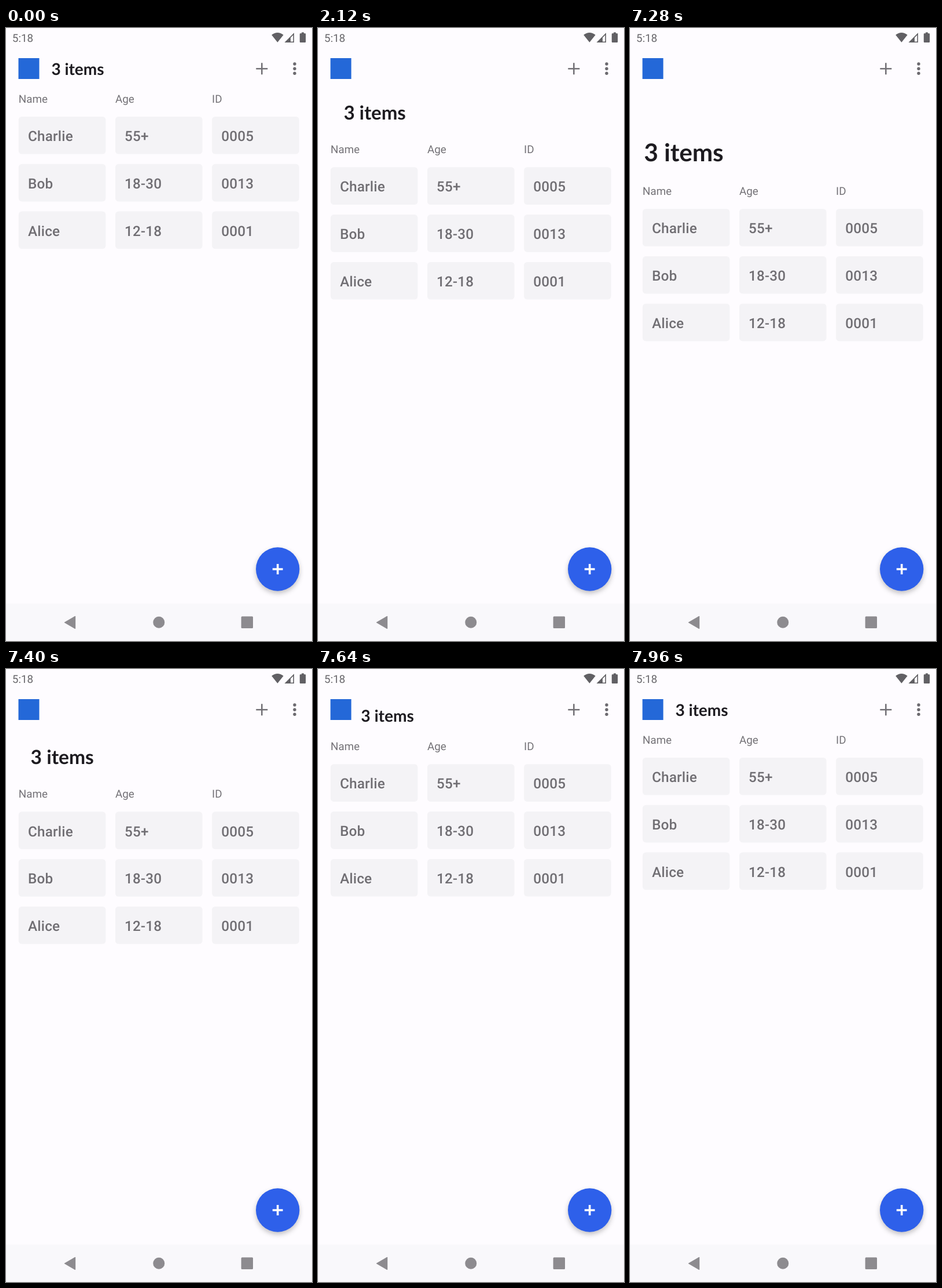
An HTML page for the animation above (10 s loop, 529x1058 px).

```html
<!DOCTYPE html>
<html lang="en">
<head>
<meta charset="utf-8">
<title>Item list</title>
<style>
  html, body { margin: 0; width: 100%; height: 100%; overflow: hidden; background: #fefcff; }
  svg { display: block; width: 100%; height: 100%; }
  text { font-family: Roboto, sans-serif; text-rendering: geometricPrecision; white-space: pre; }
  #title { font-family: Lato, sans-serif; font-weight: 700; fill: #1d1b20; }
  .small { font-size: 18.86px; fill: #747277; }
  .value { font-size: 24.25px; font-weight: 500; letter-spacing: .23px; fill: #706e73; }
  .cell { fill: #f4f3f6; }
  .status { fill: #616064; }
  .nav { fill: #8d8b8f; }
  #fab { filter: drop-shadow(0 4px 4px rgba(0, 0, 0, .24)); }
</style>
</head>
<body>
<svg viewBox="0 0 529 1058">
  <rect width="529" height="1058" fill="#fefcff"/>

  <text class="small" x="10.8" y="23.6" style="fill:#68676b">5:18</text>
  <g class="status">
    <path d="M459.2 11.9Q469.4 4 479.6 11.9L469.4 24.8Z"/>
    <path d="M481.5 25L498 8.3V25Z M492 16.8V23.4H496.4V12.3Z" fill-rule="evenodd"/>
    <path d="M511 7.5h4v1.8h2q1.2 0 1.2 1.2v13.2q0 1.2-1.2 1.2h-8q-1.2 0-1.2-1.2V10.500q0-1.2 1.2-1.2h2Z"/>
  </g>

  <rect x="21.500" y="52" width="36" height="36" fill="#2468d8"/>
  <path d="M432.300 70.300H452.300M442.300 60.300V80.300" stroke="#747277" stroke-width="2.600"/>
  <g fill="#6c6a6f">
    <circle cx="499" cy="62" r="2.700"/>
    <circle cx="499" cy="70.200" r="2.700"/>
    <circle cx="499" cy="78.300" r="2.700"/>
  </g>

  <g id="list"></g>
  <text id="title">3 items</text>

  <circle id="fab" cx="469.700" cy="934" r="37.700" fill="#2e60ea"/>
  <path d="M460.800 934H478.600M469.700 925.100V942.900" stroke="#fff" stroke-width="3.600"/>

  <rect y="993.500" width="529" height="64.500" fill="#f9f8fb"/>
  <g class="nav">
    <path d="M101.500 1026L119.500 1015.700V1036.300Z" stroke="#8d8b8f" stroke-width="1.400" stroke-linejoin="round"/>
    <circle cx="264.300" cy="1025.800" r="10"/>
    <rect x="406.600" y="1015.500" width="20.400" height="20.600" rx="1.500"/>
  </g>
</svg>

<script>
  const LOOP = 10000, STEP = 40, TRAVEL = 167;
  const list = document.getElementById('list');
  const title = document.getElementById('title');

  const columns = [
    ['Name', 'Charlie', 'Bob', 'Alice'],
    ['Age', '55+', '18-30', '12-18'],
    ['ID', '0005', '0013', '0001'],
  ];
  list.innerHTML = columns.map(([head, ...values], c) => {
    const x = 21.8 + c * 167.15;
    const cells = values.map((value, r) => {
      const y = 153 + r * 81.8;
      return `<rect class="cell" x="${x}" y="${y}" width="150.6" height="64.6" rx="5.4"/>
        <text class="value" x="${x + 16.1}" y="${y + 42.2}">${value}</text>`;
    });
    return `<text class="small" x="${x}" y="128.6">${head}</text>` + cells.join('');
  }).join('');

  const lerp = (a, b, k) => a + (b - a) * k;

  // How far the header is pulled open, 0 to 1
  function expansion(t) {
    if (t < 1960 || t >= 7960) return 0;
    if (t < 2240) return lerp(4 / TRAVEL, 1, ((t - 1960) / 280) ** 1.2);
    if (t < 7280) return 1;
    const s = (t - 7240) / 1000;
    const x = 8.3 * s + 6.6 * s * s;
    return (1 + x) * Math.exp(-x);
  }

  function draw(now) {
    const t = Math.floor((now % LOOP) / STEP) * STEP;
    const k = expansion(t);
    const bend = (k * (1 - k)) ** 2;
    list.setAttribute('transform', `translate(0 ${k * TRAVEL})`);
    title.setAttribute('x', lerp(78.4, 21.6, k + 1.2 * bend));
    title.setAttribute('y', lerp(80.5, 238, k - 0.5 * bend));
    title.style.fontSize = lerp(28, 43.5, k ** 1.75) + 'px';
  }

  const start = performance.now();
  function frame() {
    draw(performance.now() - start);
    requestAnimationFrame(frame);
  }
  frame();
</script>
</body>
</html>
```
